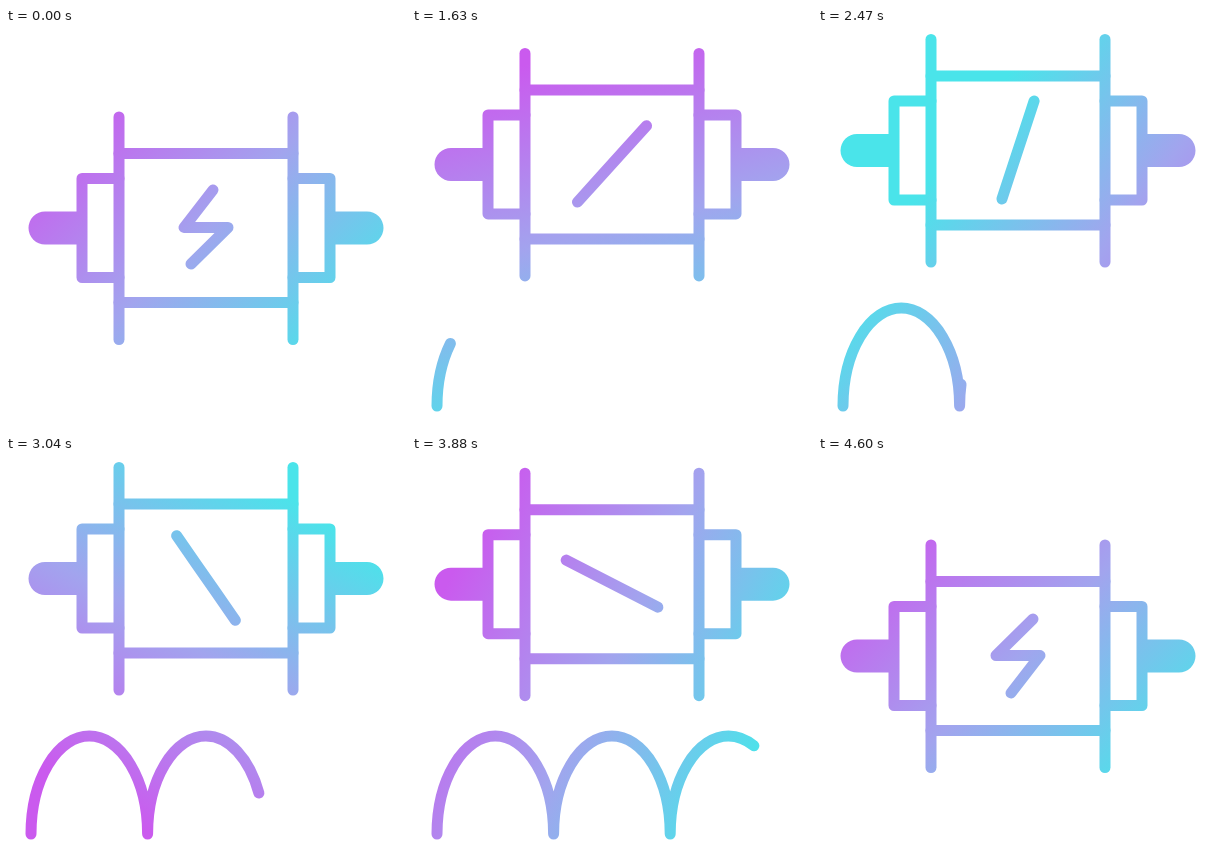
An HTML page with a canvas for the animation above (4.63 s loop, 400 by 400 pixels).

```html
<!DOCTYPE html>
<html lang="en">
<head>
<meta charset="utf-8">
<title>Electric motor</title>
<style>
  html, body { margin: 0; width: 100%; height: 100%; overflow: hidden; background: #fff; }
  canvas { display: block; width: 400px; height: 400px; }
</style>
</head>
<body>
<canvas id="stage" width="400" height="400"></canvas>
<script>
const ctx = document.getElementById('stage').getContext('2d');
const LOOP = 4630, START = 1030, END = 4600;
const ARCH = { width: 116.6, height: 98, length: 249.5, base: 378, left: 25 };
const BOLT = [[7, -37.5], [-22, 0], [22, 0], [-15, 36.5]];
const ROD = [-51.5, -17, 17, 51.5];
const RAD = Math.PI / 180;

const clamp = v => Math.min(1, Math.max(0, v));

// Symmetric ease between two times; a higher power gives a steeper middle.
function ease(t, from, to, power = 2) {
  const u = clamp((t - from) / (to - from));
  const a = u ** power;
  return a / (a + (1 - u) ** power);
}

// Smooth curve through the values at the given times, at rest at both ends.
function spline(t, times, values) {
  const last = times.length - 1;
  if (t <= times[0]) return values[0];
  if (t >= times[last]) return values[last];
  const i = times.findIndex(k => k > t) - 1;
  const slope = j => j === 0 || j === last ? 0
    : (values[j + 1] - values[j - 1]) / (times[j + 1] - times[j - 1]);
  const span = times[i + 1] - times[i], u = (t - times[i]) / span, v = 1 - u;
  return values[i] * v * v * (1 + 2 * u) + values[i + 1] * u * u * (3 - 2 * u)
    + span * u * v * (slope(i) * v - slope(i + 1) * u);
}

const BEATS = [START, 1630, 2470, 3040, 3880, END];
const WAVE_BEATS = [START, 1630, 2470, 3040, 3880, 4470];
const spin = t => spline(t, BEATS, [0, 42, 198, 325, 477, 540]);
const drawn = t => spline(t, WAVE_BEATS, [0, .0856, .3615, .61, .869, 1]);
const hueAngle = t => 45 + spline(t, BEATS, [0, 30, 172, 257, 342, 360]);
const hueShift = t => spline(t, BEATS, [0, 0, 80, 0, 0, 0]);

function paint(t) {
  const angle = hueAngle(t) * RAD, shift = hueShift(t);
  const at = d => [200 + Math.cos(angle) * (d - shift), 200 + Math.sin(angle) * (d - shift)];
  const gradient = ctx.createLinearGradient(...at(-180), ...at(180));
  gradient.addColorStop(0, '#ca5aee');
  gradient.addColorStop(.5, '#a2a4ee');
  gradient.addColorStop(1, '#4ae4ea');
  return gradient;
}

function polyline(points) {
  ctx.beginPath();
  points.forEach(p => ctx.lineTo(...p));
  ctx.stroke();
}

function motor() {
  for (const y of [125.5, 274.5]) polyline([[113, y], [287, y]]);
  for (const [plate, flange] of [[113, 76], [287, 324]]) {
    polyline([[plate, 89], [plate, 311.5]]);
    polyline([[plate, 150.5], [flange, 150.5], [flange, 249.5], [plate, 249.5]]);
  }
  ctx.beginPath();
  ctx.roundRect(22.5, 183.5, 53.5, 33, [16.5, 0, 0, 16.5]);
  ctx.roundRect(324, 183.5, 53.5, 33, [0, 16.5, 16.5, 0]);
  ctx.fill();
}

// The bolt straightens into a rod while it turns, then folds back.
function bolt(t, lift) {
  const straight = ease(t, START, 1580) - ease(t, 3930, 4590);
  const turn = spin(t) * RAD, c = Math.cos(turn), s = Math.sin(turn);
  polyline(BOLT.map(([bx, by], i) => {
    const x = bx * (1 - straight), y = by + (ROD[i] - by) * straight;
    return [200 + x * c - y * s, 199.5 - lift + x * s + y * c];
  }));
}

function wave(t) {
  if (t <= START || t >= END) return;
  const { width, height, length, base, left } = ARCH;
  ctx.globalAlpha = 1 - ease(t, 4220, 4500);
  ctx.setLineDash([drawn(t) * length * 3, 9999]);
  ctx.beginPath();
  for (let i = 0; i < 3; i++)
    ctx.ellipse(left + width * (i + .5), base, width / 2, height, 0, Math.PI, 2 * Math.PI);
  ctx.stroke();
  ctx.setLineDash([]);
  ctx.globalAlpha = 1;
}

function draw() {
  const t = performance.now() % LOOP;
  const lift = 77.5 * (ease(t, START, 1950, 2.4) - ease(t, 3708, 4381, 2.4));
  ctx.clearRect(0, 0, 400, 400);
  ctx.lineWidth = 11;
  ctx.lineCap = ctx.lineJoin = 'round';
  ctx.strokeStyle = ctx.fillStyle = paint(t);
  wave(t);
  if (t < START || t >= START + 30) bolt(t, lift);

  // Move the motor but keep the gradient fixed to the stage.
  const angle = hueAngle(t) * RAD;
  ctx.save();
  ctx.translate(0, -lift);
  ctx.strokeStyle = ctx.fillStyle = shifted(t, lift, angle);
  motor();
  ctx.restore();
  requestAnimationFrame(draw);
}

function shifted(t, lift, angle) {
  const c = Math.cos(angle), s = Math.sin(angle), shift = hueShift(t);
  const at = d => [200 + c * (d - shift), 200 + lift + s * (d - shift)];
  const gradient = ctx.createLinearGradient(...at(-180), ...at(180));
  gradient.addColorStop(0, '#ca5aee');
  gradient.addColorStop(.5, '#a2a4ee');
  gradient.addColorStop(1, '#4ae4ea');
  return gradient;
}

draw();
</script>
</body>
</html>
```
